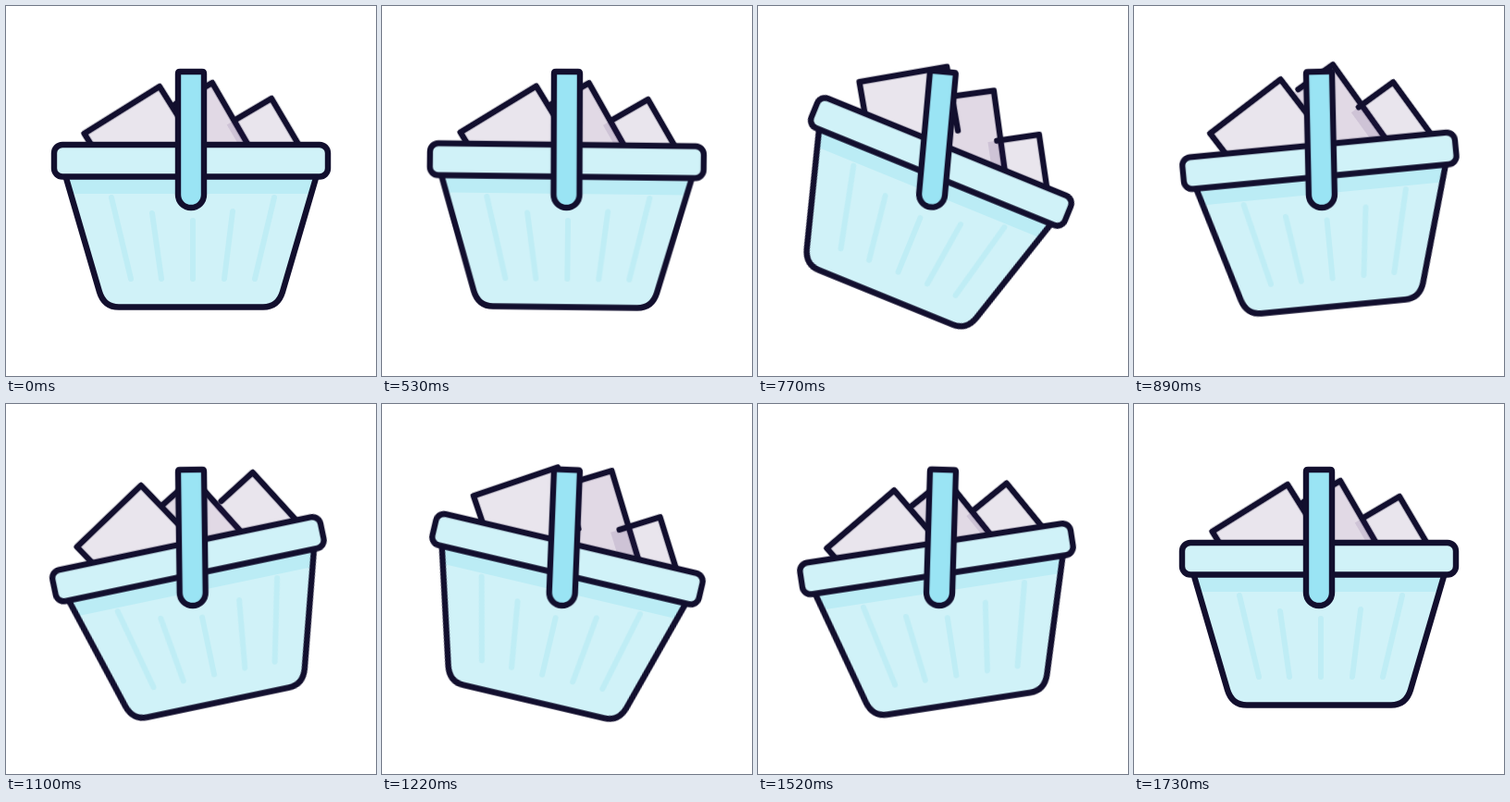
Recreate the animation shown at these times as an HTML page without scripts. Size 400 by 400 pixels, loop 1.79 s.

```html
<!DOCTYPE html>
<html lang="en">
<head>
<meta charset="utf-8">
<title>Swinging basket</title>
<style>
  html, body { margin: 0; width: 100%; height: 100%; overflow: hidden; background: #fff; }
  svg { display: block; width: 100%; height: 100%; }

  .line { stroke: #120f2e; stroke-width: 6.4; stroke-linejoin: round; stroke-linecap: round; }
  .edge { fill: none; }
  .ribs { fill: none; stroke: #bfedf5; stroke-width: 6; stroke-linecap: round; }

  .swing, .tilt, .paper { animation: 1790ms cubic-bezier(.37, 0, .63, 1) infinite; }
  .swing { transform-origin: 200px 71px; animation-name: swing; }
  .tilt { transform-origin: 200px 190px; animation-name: tilt; }
  .left { animation-name: hop-left; }
  .mid { animation-name: hop-mid; }
  .right { animation-name: hop-right; }

  /* the whole basket hangs from the top of the handle */
  @keyframes swing {
    0%, 28.49% { transform: rotate(0deg); }
    38.83% { transform: rotate(7deg); }
    53.35% { transform: rotate(-2.6deg); }
    76.54% { transform: rotate(4.2deg); }
    91.62%, 100% { transform: rotate(0deg); }
  }
  /* the tub rocks on the handle's lower end: sine in towards the middle, sine out to each peak */
  @keyframes tilt {
    0%, 28.49% { transform: rotate(0deg); }
    40.5% { transform: rotate(19.3deg); animation-timing-function: cubic-bezier(.12, 0, .39, 0); }
    49.72% { transform: rotate(-4deg); animation-timing-function: cubic-bezier(.61, 1, .88, 1); }
    56.42% { transform: rotate(-22deg); animation-timing-function: cubic-bezier(.12, 0, .39, 0); }
    61.45% { transform: rotate(-11.4deg); animation-timing-function: cubic-bezier(.61, 1, .88, 1); }
    68.44% { transform: rotate(11deg); animation-timing-function: cubic-bezier(.12, 0, .39, 0); }
    74.86% { transform: rotate(-1.5deg); animation-timing-function: cubic-bezier(.61, 1, .88, 1); }
    80.45% { transform: rotate(-13deg); }
    95.81%, 100% { transform: rotate(0deg); }
  }
  @keyframes hop-left {
    0%, 29.61%, 58.1%, 79.33%, 100% { transform: translate(0, 0); }
    44.13% { transform: translate(1px, -17.5px); }
    64.8% { transform: translate(1px, -16px); }
  }
  @keyframes hop-mid {
    0%, 40.22%, 54.75%, 60.34%, 81.01%, 100% { transform: translate(0, 0); }
    47.21% { transform: translate(2px, -24px); }
    71.23% { transform: translate(2px, -24px); }
  }
  @keyframes hop-right {
    0%, 43.02%, 68.16%, 87.71%, 100% { transform: translate(0, 0); }
    55.87% { transform: translate(1px, -18px); }
    76.54% { transform: translate(2px, -15px); }
  }
</style>
</head>
<body>
<svg viewBox="0 0 400 400">
  <g class="swing">
    <g class="tilt">
      <g class="paper mid">
        <g transform="translate(223 83) rotate(-30)">
          <rect x="-58" width="58" height="110" fill="#e1d9e5"/>
          <path class="line edge" d="M-46 0H0V110"/>
        </g>
      </g>
      <g class="paper left">
        <g transform="translate(166 87) rotate(-32)">
          <rect x="-96" width="96" height="70" fill="#e9e5ed"/>
          <path class="line edge" d="M-96 70V0H0V70"/>
        </g>
      </g>
      <g class="paper right">
        <g transform="translate(287 100) rotate(-30.5)">
          <rect x="-56" width="56" height="80" fill="#3a1560" fill-opacity=".11"/>
          <path class="line edge" d="M-46 0H0V80"/>
        </g>
      </g>

      <path fill="#d0f2f8" d="M65 186L101 309Q106 325.5 122 325.5H278Q294 325.5 299 309L335 186Z"/>
      <path fill="#bbecf5" d="M65 186H335L330 203H70Z"/>
      <path class="ribs" d="M114 207L135 295M158 224L168 295M202 232V295M245 222L236 295M290 207L269 295"/>
      <path class="line edge" d="M65 186L101 309Q106 325.5 122 325.5H278Q294 325.5 299 309L335 186"/>
      <rect class="line" x="52" y="150" width="296" height="34.5" rx="9" fill="#d0f2f8"/>
    </g>
    <path class="line" fill="#9ae4f4" d="M188 71H212Q214 71 214 73V204A14 14 0 0 1 186 204V73Q186 71 188 71Z"/>
  </g>
</svg>
</body>
</html>
```
